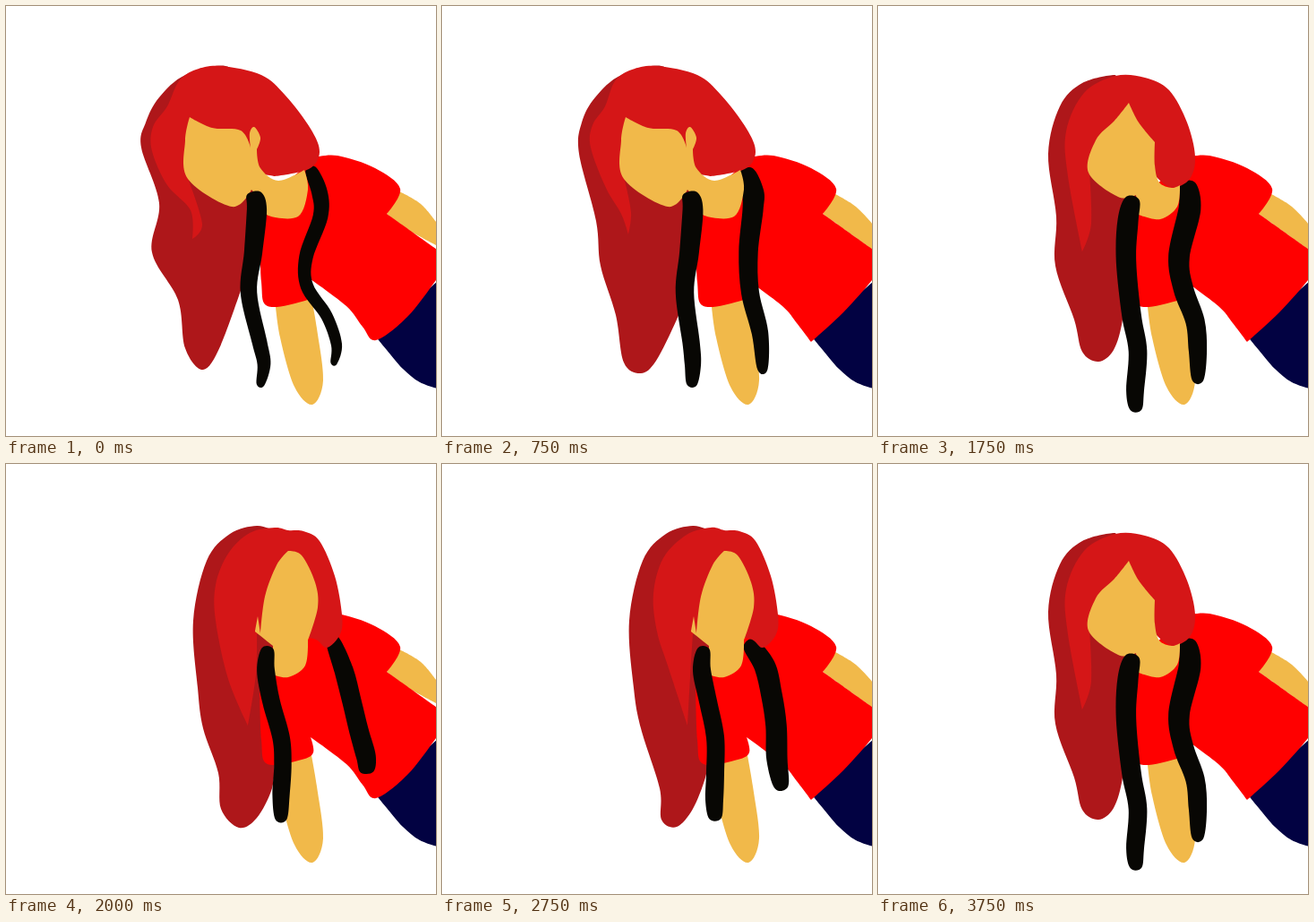
An HTML page for the animation above (4000 ms loop, 480x480 px).

```html
<!DOCTYPE html>
<html lang="en">
<head>
<meta charset="utf-8">
<title>Swaying hair</title>
<style>
html, body { margin: 0; width: 100%; height: 100%; overflow: hidden; background: #fff; }
svg { display: block; width: 100%; height: 100%; }
</style>
</head>
<body>
<svg id="stage" viewBox="0 0 480 480"></svg>
<script>
const DARK = '#ae171a', RED = '#d51617', SKIN = '#f1b94a', SHIRT = '#ff0000', BLACK = '#080704', NAVY = '#020242';
const STEP = 250;

// Key points "x,y"; a trailing "!" marks a sharp corner.
const parse = s => s.trim().split(/\s+/).map(p => {
  const [x, y] = p.replace('!', '').split(',').map(Number);
  return { x, y, sharp: p.endsWith('!') };
});

// Everything below the root line drifts sideways.
const sway = (pts, amount, root = 210) =>
  pts.map(p => ({ ...p, x: p.x + amount * Math.max(0, p.y - root) / 180 }));

// Closed Catmull-Rom outline.
function outline(pts) {
  const n = pts.length, at = i => pts[(i + n) % n];
  const tangent = i => at(i).sharp ? [0, 0]
    : [(at(i + 1).x - at(i - 1).x) / 6, (at(i + 1).y - at(i - 1).y) / 6];
  let d = `M${pts[0].x} ${pts[0].y}`;
  for (let i = 0; i < n; i++) {
    const a = at(i), b = at(i + 1), [ax, ay] = tangent(i), [bx, by] = tangent(i + 1);
    const v = [a.x + ax, a.y + ay, b.x - bx, b.y - by, b.x, b.y];
    d += 'C' + v.map(k => k.toFixed(1)).join(' ');
  }
  return d + 'Z';
}

// A lock of hair: a spine with a width that changes evenly along it.
function ribbon(spine, wide, narrow) {
  const last = spine.length - 1;
  const side = sign => spine.map((p, i) => {
    const a = spine[Math.max(0, i - 1)], b = spine[Math.min(last, i + 1)];
    const dx = b.x - a.x, dy = b.y - a.y, len = Math.hypot(dx, dy);
    const end = i === 0 || i === last ? 0.65 : 1;
    const half = sign * end * (wide + (narrow - wide) * i / last) / 2;
    return { x: p.x - dy / len * half, y: p.y + dx / len * half };
  });
  return [...side(1), ...side(-1).reverse()];
}

const frontArm = '300,325! 306,370 322,425 342,445 354,418 347,360 340,320!';
const shirt = hem => `290,218! 345,169! 370,167 412,181 440,204 425,232! 480,271! 490,290! 480,306 ${hem} 380,335 340,305! 343,322 330,330 292,335 285,308 283,240!`;
const shorts = '412,368! 425,384 443,405 462,420 485,428! 490,300!';
const bodies = {
  rest: { shirt: shirt('448,347 413,373 398,358'), arm: '439,207! 463,221 480,241! 480,267! 451,251 425,232!', shorts },
  lean: { shirt: shirt('448,342 412,375! 396,354'), arm: '439,210! 462,224 482,245! 482,273! 425,232!', shorts }
};

const crown = {
  side: '270,90! 245,67 200,77 171,102 156,130',
  face: '299,204! 285,180! 300,75! 280,69 250,78 224,108 209,175 214,250'
};
const sideLobe = '240,180! 300,190! 338,182 350,163 340,137 312,100 285,77 240,67 212,71';
const faceLobe = '280,190! 300,190! 343,195 358,205 373,190 375,168 367,125 350,86 332,75 315,74 300,71';
const skins = {
  side: '205,124! 230,136 262,139 273,158! 272,142 277,135 284,147 280,160! 284,181 304,195 333,183! 337,205 326,235 293,234 290,221! 274,205! 252,224 203,193 200,150',
  mid: '280,108! 291,130 309,152! 309,178 314,197 328,203 337,200! 334,224 315,238 291,233! 288,211! 268,213 235,186 243,150 264,128',
  face: '315,97! 330,102 345,132 348,160 337,197! 334,225 315,238 298,235! 298,203! 278,187! 281,170! 284,189! 289,148 302,113'
};

// Locks are [spine, width at root, width at tip].
const looks = {
  side: {
    back: crown.side + ' 151,158 171,220 163,275 192,328 200,382 220,406 240,378 268,300! 290,215!',
    front: '193,84 180,112 164,135 163,162 180,200 206,228 208,260! 219,243 204,195! ' + sideLobe,
    skin: skins.side,
    left: ['277,209 280,227 276,275 271,320 283,375 288,400 284,423', 24, 13],
    right: ['340,182 350,208 351,235 335,280 336,313 358,346 369,378 366,399', 19, 11]
  },
  sideLean: {
    back: crown.side + ' 153,165 172,240 177,290 194,345 203,398 222,410 239,396 262,350 278,310! 290,215!',
    front: '193,84 182,112 168,133 166,158 183,203 200,232 208,255! 211,230 204,195! ' + sideLobe,
    skin: skins.side,
    left: ['277,209 280,227 276,275 271,320 278,375 280,400 279,423', 24, 17],
    right: ['339,184 347,208 347,228 342,275 344,320 355,365 358,406', 26, 17]
  },
  mid: {
    back: '250,90! 265,77 228,86 203,112 190,165 199,235 198,290 219,350 228,386 246,397 263,384 273,350 276,300! 290,212!',
    front: '265,78 230,97 210,140 212,190 228,274! 238,243 236,185! 310,190! 328,203 348,193 354,168 345,130 325,94 298,80',
    skin: skins.mid,
    left: ['284,215 279,240 277,285 283,345 290,385 287,430 288,451', 24, 19],
    right: ['346,198 348,226 336,280 341,316 354,352 357,385 357,418', 26, 19]
  },
  face: {
    back: crown.face + ' 220,295 237,345 240,385 260,406 280,395 297,362 300,330! 290,240!',
    front: '272,77 248,100 234,135 234,175 248,240 270,292! 279,235 ' + faceLobe,
    skin: skins.face,
    left: ['292,206 290,230 296,265 307,305 309,335 307,370 307,397', 20, 19],
    right: ['364,195 377,230 386,265 394,298 402,327 403,344', 21, 22]
  },
  faceLean: {
    back: crown.face + ' 222,295 243,362 245,397 262,405 280,385 294,350 300,320! 290,240!',
    front: '273,79 247,105 236,145 240,187 252,225 274,292! 277,238 ' + faceLobe,
    skin: skins.face,
    left: ['292,206 290,230 297,265 305,305 305,345 304,375 305,396', 20, 20],
    right: ['343,200 360,225 368,258 373,292 374,330 379,361', 24, 23]
  }
};
looks.sideFar = { ...looks.sideLean, left: looks.mid.left, right: looks.mid.right };

// Each view rests, leans, swings further and leans again.
const view = (rest, lean, far, ease, drift) => [
  { look: rest, body: 'rest', drift: ease },
  { look: lean, body: 'lean', drift: 0 },
  { look: far, body: 'lean', drift },
  { look: lean, body: 'lean', drift: 0 }
];
const middle = view('mid', 'mid', 'mid', -5, 4);
const beats = [
  ...view('side', 'sideLean', 'sideFar', 0, 3), ...middle,
  ...view('face', 'faceLean', 'faceLean', 0, -4), ...middle
];

const svg = document.getElementById('stage');
const layers = [
  ['back', DARK], ['frontArm', SKIN], ['shorts', NAVY], ['arm', SKIN], ['shirt', SHIRT],
  ['right', BLACK], ['front', RED], ['skin', SKIN], ['left', BLACK]
].map(([name, fill]) => {
  const node = document.createElementNS('http://www.w3.org/2000/svg', 'path');
  node.setAttribute('fill', fill);
  svg.append(node);
  return { name, node };
});

const poses = beats.map(({ look, body, drift }) => {
  const parts = { ...looks[look], ...bodies[body], frontArm };
  return layers.map(({ name }) => {
    const part = parts[name];
    if (Array.isArray(part)) {
      const [spine, wide, narrow] = part;
      return outline(ribbon(sway(parse(spine), drift), wide, narrow));
    }
    const hair = name === 'back' || name === 'front';
    return outline(sway(parse(part), hair ? drift : 0));
  });
});

function draw(time) {
  const pose = poses[Math.floor(time / STEP) % poses.length];
  layers.forEach(({ node }, i) => node.setAttribute('d', pose[i]));
}

const start = performance.now();
function tick() {
  draw(performance.now() - start);
  requestAnimationFrame(tick);
}
tick();
</script>
</body>
</html>
```
